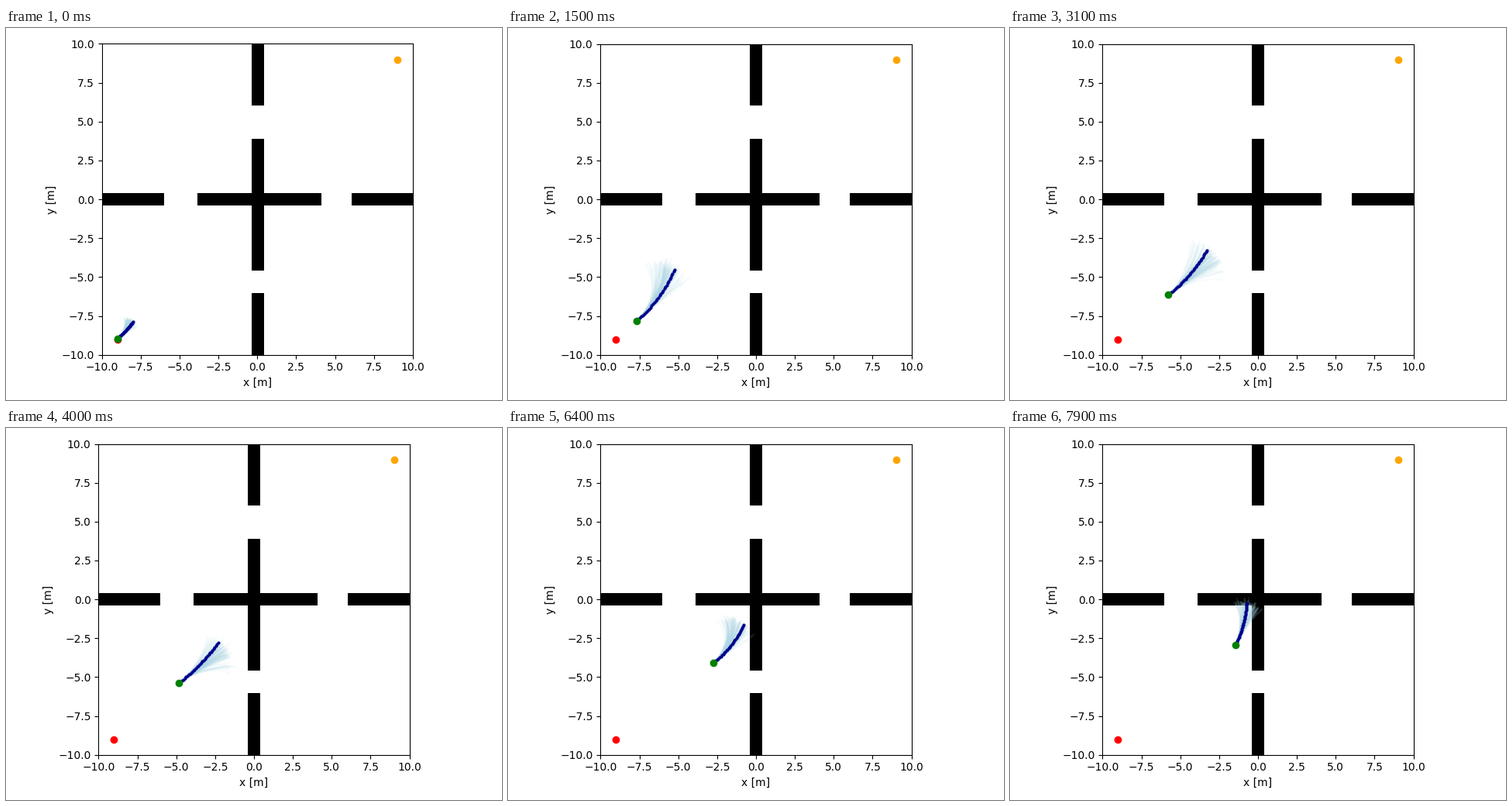
A matplotlib script for the animation above (8 s loop, 640x480 px).

```python
import numpy as np
import matplotlib.pyplot as plt
from matplotlib.animation import FuncAnimation
from matplotlib.collections import LineCollection

FRAMES, STEPS, SAMPLES = 80, 30, 110
START, GOAL = (-9, -9), (9, 9)

# Waypoints of the robot: frame number and position x + iy
KEYS = np.array([0, 9, 22, 40, 53, 64, 79, 90])
WAY = np.array([-9 - 8.95j, -8.36 - 8.43j, -6.78 - 7.02j, -4.83 - 5.38j,
                -3.64 - 4.48j, -2.74 - 4.08j, -1.45 - 2.93j, -1 - 2j])
SLOPE = np.gradient(WAY, KEYS)
SLOPE[0] *= 0.4  # starts slowly


def robot(k):
    """Cubic Hermite curve through the waypoints."""
    i = min(np.searchsorted(KEYS, k, side="right") - 1, len(KEYS) - 2)
    h = KEYS[i + 1] - KEYS[i]
    u = (k - KEYS[i]) / h
    return ((1 + 2 * u) * (1 - u) ** 2 * WAY[i] + u * (1 - u) ** 2 * h * SLOPE[i]
            + u * u * (3 - 2 * u) * WAY[i + 1] + u * u * (u - 1) * h * SLOPE[i + 1])


def trace(origin, heading, length):
    """Points reached by moving along the given headings in equal steps."""
    moves = np.exp(1j * heading) * length / (STEPS - 1)
    z = origin + np.cumsum(moves, axis=-1)
    return np.stack([z.real, z.imag], axis=-1)


def predict(k):
    """Planned path, bending left of the travel direction, and its random rollouts."""
    rng = np.random.default_rng(100 + k)
    here = robot(k)
    s = np.linspace(0, 1, STEPS)
    length = (4.3 - 0.02 * k) * (1 - 0.67 * np.exp(-k / 3))
    heading = np.angle(robot(k + 10) - here) + np.radians(rng.normal(20, 4)) * s

    sway = 17 * np.cos(2 * np.pi * (k - 9) / 55)
    curve = np.radians(rng.normal(sway, 17, (SAMPLES, 1))) * s
    drift = np.cumsum(rng.normal(0, 0.03, (SAMPLES, STEPS)), axis=1)
    reach = length * rng.normal(1, 0.05, (SAMPLES, 1))
    return trace(here, heading, length), trace(here, heading + curve + drift, reach)


def wall(pos, *gaps):
    """Solid cells along one axis, left open inside the gaps."""
    return ~np.any([(pos > lo) & (pos < hi) for lo, hi in gaps], axis=0)


fig, ax = plt.subplots(figsize=(6.4, 4.8), dpi=100)
ax.set(xlim=(-10, 10), ylim=(-10, 10), xlabel="x [m]", ylabel="y [m]", aspect="equal")

# The layout settles after the second pass
boxes = []
for _ in range(2):
    fig.tight_layout()
    boxes.append(ax.get_position(original=True).frozen())

# Occupancy map with 0.1 m cells
cell = np.arange(-9.95, 10, 0.1)
bar = np.abs(cell) < 0.4
grid = (np.outer(bar, wall(cell, (-6, -3.9), (4.1, 6)))
        | np.outer(wall(cell, (-6, -4.6), (3.9, 6)), bar))
ax.imshow(grid, cmap="Greys", origin="lower", extent=(-10, 10, -10, 10),
          interpolation="nearest")

ax.plot(*START, "o", color="red")
ax.plot(*GOAL, "o", color="orange")
fan = LineCollection([], colors="lightblue", alpha=0.1, lw=1.5, zorder=2.1)
ax.add_collection(fan, autolim=False)
best, = ax.plot([], [], ".", color="darkblue", ms=4, zorder=2.2)
body, = ax.plot([], [], "o", color="green", zorder=2.3)


def draw(k):
    ax.set_position(boxes[min(k, 1)])
    path, rollouts = predict(k)
    here = robot(k)
    fan.set_segments(rollouts)
    best.set_data(*path.T)
    body.set_data([here.real], [here.imag])
    return fan, best, body


anim = FuncAnimation(fig, draw, frames=FRAMES, interval=100, repeat=True, repeat_delay=0)
plt.show()
```
